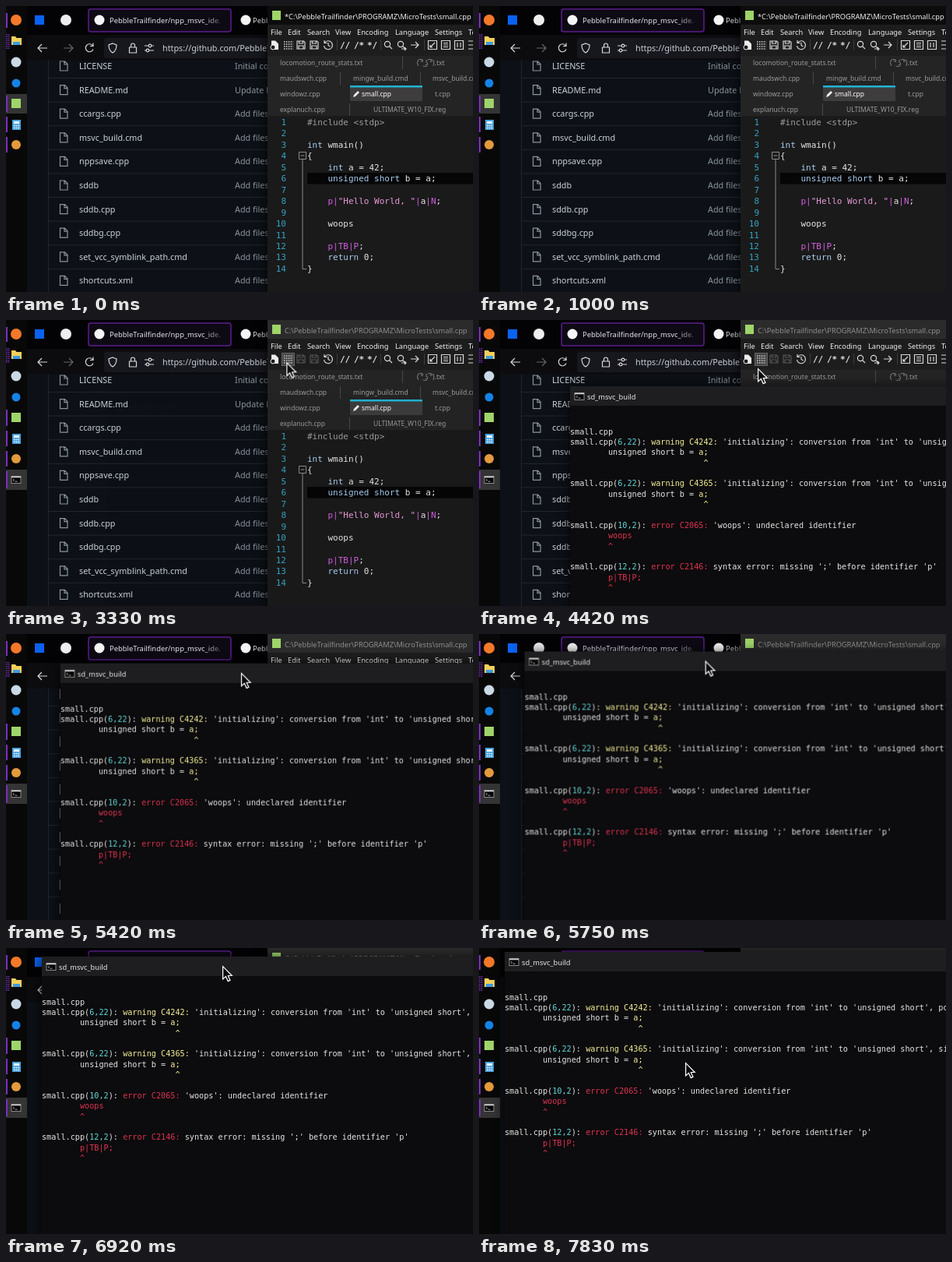
These frames come from a looping animation (600 by 367 pixels, 8000 ms). An HTML page:

```html
<!DOCTYPE html>
<html lang="en">
<head>
<meta charset="utf-8">
<title>Build from the editor</title>
<style>
html, body { margin: 0; width: 100%; height: 100%; overflow: hidden; background: #000; }
svg { display: block; width: 600px; height: 367px; }
text { font-family: "Noto Sans", "Open Sans", sans-serif; white-space: pre; }
.mono text { font-family: "DejaVu Sans Mono", "Noto Sans Mono", monospace; }
.line { fill: none; stroke: #d8d8d8; stroke-width: 1.2; }
.file { font-size: 10.8px; fill: #c9d1d9; }
.note { font-size: 10.8px; fill: #8b949e; }
.tab { font-size: 9.4px; fill: #e4e4ea; }
.menu { font-size: 9.25px; fill: #f0f0f0; }
.doc { font-size: 8.5px; fill: #9b9b9b; }
#code text { font-size: 11px; }
#out text { font-size: 10.18px; }
.num { fill: #35a4c4; }
.g { fill: #9d9d9d; } .k { fill: #a9cdf0; } .w { fill: #e6e6e6; }
.m { fill: #d35fe0; } .s { fill: #e79ad9; }
.c { fill: #61d6d6; } .y { fill: #f5f19a; } .r { fill: #dc3452; }
.shade { filter: drop-shadow(0 2px 8px rgba(0,0,0,.85)); }

#win, #mouse, .anim, #caret { animation: 8s linear infinite; }
#win { animation-name: drag; }
#mouse { animation-name: point; }
#caret { animation-name: blink; animation-timing-function: step-end; }
.anim { animation-timing-function: step-end; }
.dirty { animation-name: dirty; }
.clean { animation-name: clean; }
.front { animation-name: front; }
.back { animation-name: back; }
.hover { animation-name: hover; }
.save { animation-name: save; }
.echo { animation-name: echo; }
.report { animation-name: report; }
#pop { animation: pop 8s ease-out infinite; }

@keyframes drag {
  0%, 62.8% { transform: translate(117px, 85px); }
  64.6% { transform: translate(103px, 71px); }
  67.7% { transform: translate(70px, 38px); }
  72.8% { transform: translate(56px, 19px); }
  76% { transform: translate(52px, 14px); }
  78.2%, 80% { transform: translate(47px, 11px); }
  86.5% { transform: translate(46px, 11px); }
  89.6% { transform: translate(37px, 6px); }
  91%, 100% { transform: translate(33px, 5px); }
}
@keyframes point {
  0%, 21.8% { transform: translate(455px, 307px); opacity: 0; }
  21.85% { transform: translate(455px, 307px); opacity: 1; }
  22.85% { transform: translate(362px, 60px); opacity: 1; }
  26.5% { transform: translate(362px, 60px); }
  27.1%, 40% { transform: translate(361px, 52px); }
  47%, 55.3% { transform: translate(358px, 62px); }
  61%, 62.8% { transform: translate(349px, 97px); }
  64.6% { transform: translate(335px, 83px); }
  67.7% { transform: translate(302px, 50px); }
  72.8% { transform: translate(288px, 31px); }
  76% { transform: translate(284px, 26px); }
  78.2%, 80% { transform: translate(279px, 23px); }
  86.5% { transform: translate(278px, 23px); }
  89.6% { transform: translate(269px, 18px); }
  91%, 92% { transform: translate(265px, 17px); }
  97.5%, 100% { transform: translate(265px, 147px); opacity: 1; }
}
@keyframes blink {
  0% { opacity: 0; } .63% { opacity: 1; } 7.25% { opacity: 0; }
  13.8% { opacity: 1; } 20.5% { opacity: 0; } 27.1% { opacity: 1; }
  33.7% { opacity: 0; } 100% { opacity: 0; }
}
@keyframes dirty { 0% { opacity: 1; } 31.25%, 100% { opacity: 0; } }
@keyframes clean { 0% { opacity: 0; } 31.25% { opacity: 1; } 41.6%, 100% { opacity: .5; } }
@keyframes front { 0% { opacity: 1; } 41.6%, 100% { opacity: 0; } }
@keyframes back { 0% { opacity: 0; } 41.6%, 100% { opacity: 1; } }
@keyframes hover { 0% { opacity: 0; } 22.8% { opacity: 1; } 60%, 100% { opacity: 0; } }
@keyframes save { 0% { opacity: 1; } 31.25%, 100% { opacity: .3; } }
@keyframes pop {
  0%, 41.6% { opacity: 0; transform: translate(20px, 14px) scale(.95); }
  44.5%, 100% { opacity: 1; transform: none; }
}
@keyframes echo { 0% { opacity: 0; } 47.8%, 100% { opacity: 1; } }
@keyframes report { 0% { opacity: 0; } 52%, 100% { opacity: 1; } }
</style>
</head>
<body>
<svg viewBox="0 0 600 367">
  <defs>
    <linearGradient id="fade"><stop offset=".8" stop-color="#0d0a14" stop-opacity="0"/><stop offset="1" stop-color="#0d0a14"/></linearGradient>
    <g id="term">
      <rect x="-6" y="-4.5" width="12" height="9" fill="#050505" stroke="#8a8a8a"/>
      <path d="M-6-3.5H6" stroke="#d0d0d0" stroke-width="1.6"/>
      <path d="M-4-.8l1.6 1.3-1.6 1.3M-1.5 2.2h3" fill="none" stroke="#bbb" stroke-width=".9"/>
    </g>
    <g id="disk"><path class="line" d="M-5-5H3.5L5-3.5V5H-5ZM-2.5-5v3h5v-3M-3 5V1h6v4"/></g>
    <g id="lens"><circle class="line" cx="-1" cy="-1" r="3.6"/><path class="line" d="M1.6 1.6L5 5"/></g>
  </defs>

  <!-- browser -->
  <rect width="600" height="367" fill="#0d1117"/>
  <rect width="600" height="37" fill="#030305"/>
  <rect y="37" width="600" height="33" fill="#0c0c0f"/>
  <rect x="126" y="41" width="300" height="26" rx="3" fill="#17171e"/>
  <rect x="37" y="12" width="12" height="12" fill="#0a62f0"/>
  <circle cx="77" cy="18" r="7" fill="#eee"/>
  <rect x="106" y="4" width="183" height="29" rx="3" fill="#0d0a14" stroke="#5c1d8c" stroke-width="1.5"/>
  <circle cx="120" cy="18" r="6.5" fill="#f4f4f4"/>
  <text class="tab" x="133" y="21.5">PebbleTrailfinder/npp_msvc_ide.</text>
  <rect x="133" y="8" width="152" height="21" fill="url(#fade)"/>
  <circle cx="308" cy="18" r="6.5" fill="#f4f4f4"/>
  <text class="tab" x="317" y="21.5">PebbleTrail</text>
  <g class="line">
    <path d="M53 54H41m5-5l-5 5 5 5"/>
    <path d="M74 54h12m-5-5l5 5-5 5" stroke="#66666c"/>
    <path d="M111.5 51a5 5 0 1 0 .5 4.5M112 47.5v4h-4"/>
    <path d="M137 48l5 2c0 5-1.5 8-5 10-3.5-2-5-5-5-10z"/>
    <path d="M158.5 53h9v7h-9zM160.5 53v-2.5a2.5 2.5 0 0 1 5 0V53"/>
    <path d="M178 51h5m4 0h3M178 57h2m4 0h6"/><circle cx="185" cy="51" r="1.8"/><circle cx="182" cy="57" r="1.8"/>
  </g>
  <text class="file" x="201" y="58" fill="#eee">https://github.com/PebbleTrailfinder</text>
  <path d="M54.5 70V367" stroke="#21262d"/>
  <g id="files"></g>

  <!-- taskbar -->
  <rect width="27" height="367" fill="#080808"/>
  <rect class="anim front" y="113" width="27" height="25" fill="#343434"/>
  <rect class="anim back" y="192" width="27" height="26" fill="#343434"/>
  <path d="M1 9V28M1 115V136M1 142V162M1 168V188" stroke="#7a2fb8" stroke-width="2"/>
  <path d="M1 36V55M3.5 36V55" stroke="#7a2fb8" stroke-width="1.5" stroke-dasharray="1.5 1"/>
  <circle cx="13" cy="18" r="7" fill="#f5792a"/>
  <path d="M7 39h5l1.5 2H20v9H7z" fill="#f4cf5c"/><path d="M9 46h9v4H9z" fill="#3d9be0"/>
  <circle cx="13" cy="72" r="6.5" fill="#c9d9e6"/>
  <circle cx="13" cy="99" r="5.5" fill="#1583e6"/>
  <rect x="7" y="119" width="12" height="12" fill="#9fd46a"/>
  <rect x="8" y="146" width="11" height="13" fill="#4aa3df"/>
  <path d="M10 149.5h7" stroke="#f2f8fc" stroke-width="3"/>
  <path d="M10 153.5h7M10 156.5h7" stroke="#f2f8fc" stroke-width="1.6" stroke-dasharray="1.6 1.1"/>
  <circle cx="13" cy="178" r="6" fill="#e39a3c"/>
  <g class="anim back"><path d="M1 194V216" stroke="#7a2fb8" stroke-width="2"/><use href="#term" x="13" y="205"/></g>

  <!-- editor -->
  <rect class="shade" x="336" width="280" height="380" fill="#1a1a1a"/>
  <rect x="336" width="264" height="24" fill="#0c0c0c"/>
  <rect class="anim back" x="336" width="264" height="24" fill="#2b2b2b"/>
  <rect x="336" y="24" width="264" height="40" fill="#1d1d1d"/>
  <rect x="336" y="64" width="264" height="77" fill="#242424"/>
  <rect x="342" y="6" width="11" height="12" fill="#9fd46a"/>
  <text class="menu anim dirty" x="358" y="16.5">*C:\PebbleTrailfinder\PROGRAMZ\MicroTests\small.cpp</text>
  <text class="menu anim clean" x="358" y="16.5">C:\PebbleTrailfinder\PROGRAMZ\MicroTests\small.cpp</text>
  <g id="menu"></g>
  <rect class="anim hover" x="354.5" y="42.5" width="16" height="16" fill="#454545" stroke="#666"/>
  <path d="M341 44.5h5l4 4V56h-9z" fill="#eee"/><circle cx="343" cy="53" r="3" fill="#1d1d1d" stroke="#eee"/>
  <path d="M357 46h12M357 49h12M357 52h12M357 55h12" stroke="#aaa" stroke-width="1.8" stroke-dasharray="1.5 1.4"/>
  <g class="anim save"><use href="#disk" x="379" y="50"/><use href="#disk" x="396" y="50"/></g>
  <path class="line" d="M409.5 47a5.5 5.5 0 1 1-1 4M409 44v3.5h3.5M414 47v3.5l2.5 1.5"/>
  <path d="M425.5 43v14M481.5 43v14M537.5 43v14" stroke="#3c3c3c"/>
  <g class="mono" font-size="11" font-weight="700" fill="#e4e4e4"><text x="429" y="54">//</text><text x="447" y="54">/*</text><text x="464" y="54">*/</text></g>
  <use href="#lens" x="491" y="50"/><use href="#lens" x="508" y="50"/><path class="line" d="M508 55h6m-2-2l2 2-2 2M520 50h10m-4-4l4 4-4 4"/>
  <g class="line"><path d="M542.5 44.5h11v11h-11zM559.5 44.5h11v11h-11zM576.5 44.5h11v11h-11z"/>
    <path d="M545 53l6-6m-6 3v3h3M562 47.5h6M562 50h6M562 52.5h6M580 47v6m4-6v6M594 45h8M594 50h8M594 55h8"/></g>
  <path d="M509.5 65v16M429.5 85v16M532.5 85v16M441.5 125v16" stroke="#484848"/>
  <rect x="442" y="102" width="93" height="20" fill="#3d3d3d"/>
  <rect x="442" y="102" width="93" height="2.5" fill="#22b3d3"/>
  <path d="M446 117l1-3 5-5 2 2-5 5z" fill="#eee"/>
  <g id="docs"></g>

  <g id="code" class="mono">
    <rect x="387" y="214" width="213" height="14.5" fill="#060606"/>
    <path class="line" style="stroke:#8a8a8a;stroke-width:1" d="M376.5 187.5h9v9h-9zM378.5 192h5M381 196.5V337.5h5"/>
  </g>
  <path id="caret" d="M553.5 214.5v13" stroke="#fff" stroke-width="1.2"/>

  <!-- console -->
  <g id="win"><g id="pop">
    <rect class="shade" width="700" height="500" fill="#0c0b0d"/>
    <rect width="700" height="25" fill="#1e1e20"/>
    <use href="#term" x="12" y="13"/>
    <text x="22" y="16.5" font-size="9.25" fill="#e8e8e8">sd_msvc_build</text>
    <g id="out" class="mono"></g>
  </g></g>

  <g id="mouse"><path d="M.6 .6V17l3.8-3.4 2.8 6 2.8-1.2L7.300 12.500H12.300z" fill="#0a0a0a" stroke="#fff" stroke-width="1.2"/></g>
</svg>
<script>
const esc = s => s.replace(/&/g, "&amp;").replace(/</g, "&lt;");
const text = (x, y, s, cls, extra = "") => `<text x="${x}" y="${y}" class="${cls}" ${extra}>${s}</text>`;
const add = (id, html) => document.getElementById(id).insertAdjacentHTML("beforeend", html);

// "class~text~class~text" becomes coloured spans
const spans = s => s.split("~").reduce((out, part, i, all) =>
  i % 2 ? out + `<tspan class="${all[i - 1]}">${esc(part)}</tspan>` : out, "");

const files = ["LICENSE", "README.md", "ccargs.cpp", "msvc_build.cmd", "nppsave.cpp", "sddb",
  "sddb.cpp", "sddbg.cpp", "set_vcc_symblink_path.cmd", "shortcuts.xml"];
files.forEach((name, i) => {
  const y = 77 + i * 30.6, note = ["Initial commit", "Update README"][i] || "Add files via upload";
  add("files", `<path d="M54 ${y + 15.5}H600" stroke="#21262d"/>
    <path transform="translate(74 ${y})" d="M-4.5-6H1.5L5-2.5V6H-4.5ZM1-6v4H5" fill="none" stroke="#8b949e" stroke-width="1.2"/>`
    + text(94, y + 4, name, "file") + text(294, y + 4, note, "note"));
});

[["File", 340], ["Edit", 362], ["Search", 387], ["View", 423], ["Encoding", 451], ["Language", 500],
  ["Settings", 551], ["Tools", 594]].forEach(([s, x]) => add("menu", text(x, 37, s, "menu")));

[["locomotion_route_stats.txt", 352, 75.5], ["( ͡° ͜ʖ ͡°).txt", 528, 75.5],
  ["maudswch.cpp", 352, 96], ["mingw_build.cmd", 446, 96], ["msvc_build.cmd", 548, 96],
  ["windowz.cpp", 352, 116], ["t.cpp", 551, 116],
  ["explanuch.cpp", 352, 136], ["ULTIMATE_W10_FIX.reg", 472, 136]]
  .forEach(([s, x, y]) => add("docs", text(x, y, s, "doc")));
add("docs", text(457, 116, "small.cpp", "doc", 'style="fill:#fff"'));

const code = ["g~#include <stdp>", "", "k~int~w~ wmain()", "w~{", "k~    int~w~ a = 42;",
  "k~    unsigned short~w~ b = a;", "", "m~    p|~s~\"Hello World, \"~m~|~w~a~m~|N~w~;", "",
  "w~    woops", "", "m~    p|TB|P~w~;", "k~    return~w~ 0;", "w~}"];
code.forEach((s, i) => {
  const y = 153 + i * 14.45;
  add("code", text(360, y, i + 1, "num", 'text-anchor="end"') + text(387, y, spans(s), "w"));
});

const at = pos => `w~small.cpp(~c~${pos}~w~): `;
const warn = (id, tail) => [
  at("6,22") + `~y~warning ${id}:~w~ 'initializing': conversion from 'int' to 'unsigned short', ${tail}`,
  "w~        unsigned short b = ~y~a;", "y~" + " ".repeat(28) + "^", ""];
const fail = (pos, id, msg, src) => [
  at(pos) + `~r~error ${id}:~w~ ${msg}`, "r~        " + src, "r~        ^", ""];
["w~small.cpp",
  ...warn("C4242", "possible loss of data"),
  ...warn("C4365", "signed/unsigned mismatch"),
  ...fail("10,2", "C2065", "'woops': undeclared identifier", "woops"),
  ...fail("12,2", "C2146", "syntax error: missing ';' before identifier 'p'", "p|TB|P;")]
  .forEach((s, i) => add("out", text(0, 61.7 + i * 13.35, spans(s), "w anim " + (i ? "report" : "echo"))));
</script>
</body>
</html>
```
